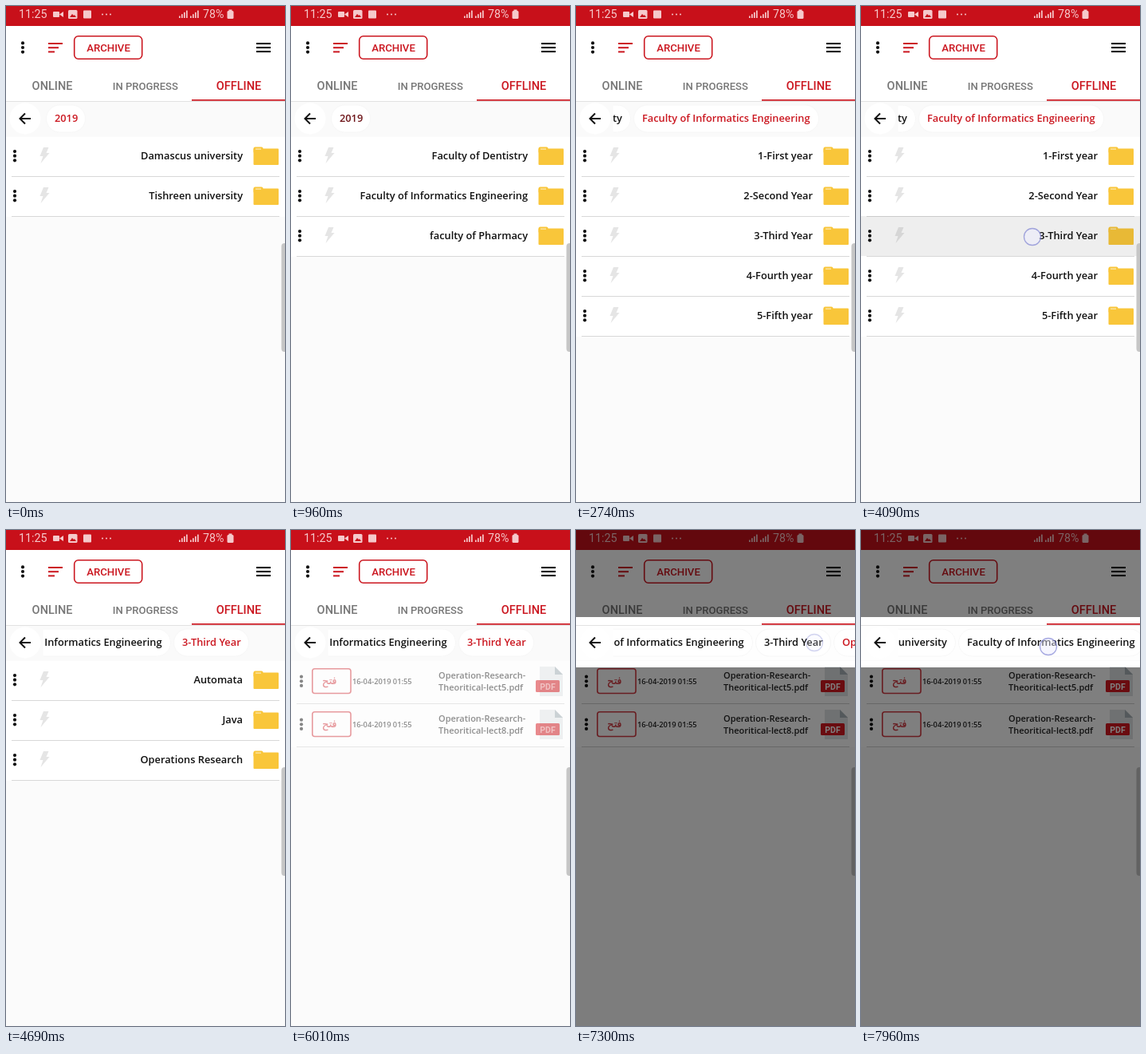
Write an HTML page with a canvas that moves like this. It is 350 px wide and 621 px high and loops after 7.99 s.

```html
<!DOCTYPE html>
<html lang="en">
<head>
<meta charset="utf-8">
<title>Archive browser</title>
<style>
  html, body { margin: 0; width: 100%; height: 100%; overflow: hidden; background: #fff; }
  canvas { display: block; }
</style>
</head>
<body>
<canvas id="stage" width="350" height="621"></canvas>
<script>
const c = document.getElementById('stage').getContext('2d');
const LOOP = 7990;
const RED = '#cb1720', BLACK = '#111';
const BODY = '"Open Sans", "Noto Sans", sans-serif';
const LABEL = `600 12.8px ${BODY}`;
const UI = 'Roboto, sans-serif';

// Lists, each with the time it appears
const lists = [
  { at: -999, items: ['Damascus university', 'Tishreen university'] },
  { at: 640, items: ['Faculty of Dentistry', 'Faculty of Informatics Engineering', 'faculty of Pharmacy'] },
  { at: 2330, items: ['1-First year', '2-Second Year', '3-Third Year', '4-Fourth year', '5-Fifth year'] },
  { at: 4280, items: ['Automata', 'Java', 'Operations Research'] },
  { at: 5960, files: ['5', '8'] }
];

// Breadcrumbs: label, left and right text edge before scrolling, time of opening
const crumbs = [
  ['2019', 61, 89, -999],
  ['Damascus university', 114, 242, 850],
  ['Faculty of Informatics Engineering', 267, 478, 2410],
  ['3-Third Year', 503, 576, 4360],
  ['Operations Research', 601, 728, 6030]
];

// Breadcrumb scrolling: start, end, distance
const scrolls = [
  [2450, 2710, 184], [4400, 4660, 98], [6090, 6350, 152],
  [6780, 7300, -167], [7440, 7960, -133]
];

// Touches: start, last move, end, x, y, horizontal travel, tapped row
const touches = [
  [90, 520, 520, 190, 190, 0, 0], [2000, 2260, 2260, 200, 239, 0, 1],
  [3950, 4210, 4210, 215, 289, 0, 2], [5610, 5880, 5880, 210, 289, 0, 2],
  [6780, 7300, 7350, 132, 141, 167], [7440, 7960, 8100, 102, 146, 133]
];

const progress = (t, a, b) => Math.min(1, Math.max(0, (t - a) / (b - a)));
const ease = p => p * p * (3 - 2 * p);

function rect(x, y, w, h, fill) {
  c.fillStyle = fill;
  c.fillRect(x, y, w, h);
}

function round(x, y, w, h, r, fill, stroke, line = 1) {
  c.beginPath();
  c.roundRect(x, y, w, h, r);
  if (fill) { c.fillStyle = fill; c.fill(); }
  if (stroke) { c.strokeStyle = stroke; c.lineWidth = line; c.stroke(); }
}

function disc(x, y, r, fill) {
  c.beginPath();
  c.arc(x, y, r, 0, 7);
  c.fillStyle = fill;
  c.fill();
}

function shape(points, fill) {
  c.beginPath();
  for (let i = 0; i < points.length; i += 2) c.lineTo(points[i], points[i + 1]);
  c.fillStyle = fill;
  c.fill();
}

function text(s, x, y, font, fill, align = 'left') {
  c.font = font;
  c.fillStyle = fill;
  c.textAlign = align;
  c.fillText(s, x, y);
}

function dots(x, y) {
  for (const dy of [-5.6, 0, 5.6]) disc(x, y + dy, 2.1, BLACK);
}

function statusBar() {
  const ink = '#f5c9cb';
  rect(0, 0, 350, 25, '#c8101a');
  text('11:25', 16, 15.3, `14.3px ${UI}`, ink);
  round(59, 7, 8, 7, 1, ink);
  shape([67, 10.5, 72, 7, 72, 14], ink);
  round(78, 5, 11.5, 11, 1.5, ink);
  shape([80, 14, 83, 10, 85, 12, 86, 11, 88, 14], '#c8101a');
  round(97, 5.5, 10, 10, 1, ink);
  for (const x of [121, 126, 131]) disc(x, 10.5, 1, ink);
  for (const x of [217, 231])
    for (let i = 0; i < 4; i++) rect(x + i * 3, 12.5 - i * 2.3, 1.7, 2.5 + i * 2.3, ink);
  text('78%', 247, 15.3, `14.2px ${UI}`, ink);
  round(277.5, 6, 8, 10, 1.5, ink);
  rect(279.5, 4.5, 4, 2, ink);
}

function header() {
  rect(0, 25, 350, 94, '#fff');
  dots(21, 52);
  [18, 13, 8].forEach((w, i) => rect(53, 46 + i * 5.2, w, 2, RED));
  round(85.7, 37.8, 85, 28.4, 5, null, RED, 1.6);
  text('ARCHIVE', 128.5, 56.5, `500 13.2px ${UI}`, RED, 'center');
  for (const y of [46, 51, 56]) rect(314, y, 18, 2.1, BLACK);
  text('ONLINE', 58, 105, `500 14.5px ${UI}`, '#777', 'center');
  text('IN PROGRESS', 174.8, 104.5, `500 13.1px ${UI}`, '#777', 'center');
  text('OFFLINE', 292, 105, `500 14.5px ${UI}`, RED, 'center');
}

function folderRow(label, y) {
  rect(0, y + 1, 350, 50, '#fff');
  rect(7, y + 50, 336, 1, '#d8d8d8');
  dots(11, y + 24.7);
  shape([47, y + 14, 53.5, y + 14, 50.5, y + 21, 54.5, y + 21, 43.5, y + 34, 46.5, y + 25, 42.5, y + 25], '#e5e5e5');
  text(label, 297, y + 29, LABEL, BLACK, 'right');
  round(310.5, y + 13.5, 12, 8, 2, '#f9c63a');
  round(310.5, y + 15.5, 31.5, 20.5, 1, '#f9c63a');
  rect(313, y + 15.5, 7, 1.2, '#fdeab8');
}

function fileRow(number, y) {
  rect(0, y + 1, 350, 54, '#fff');
  rect(7, y + 54, 336, 1, '#d0d0d0');
  dots(13, y + 26.3);
  round(26.8, y + 10.7, 48.2, 30.8, 3, null, '#d23a42', 1.6);
  text('فتح', 51, y + 30, '600 10.5px "Noto Sans Arabic", "DejaVu Sans", sans-serif', '#d23a42', 'center');
  text('16-04-2019 01:55', 77, y + 29.5, `600 9.3px ${BODY}`, '#222');
  text('Operation-Research-', 185, y + 23, `600 11px ${BODY}`, '#222');
  text(`Theoritical-lect${number}.pdf`, 185, y + 37.5, `600 11px ${BODY}`, '#222');
  shape([312, y + 8, 331, y + 8, 341, y + 18, 341, y + 45, 312, y + 45], '#e0e3e5');
  shape([331, y + 8, 341, y + 18, 331, y + 18], '#a9b3b9');
  round(307, y + 25, 30, 15, 1.5, '#d51920');
  text('PDF', 322, y + 36.5, `bold 10.5px ${UI}`, '#fff', 'center');
}

function list(t) {
  rect(0, 163, 350, 458, '#fbfbfb');
  const current = lists.findLast(l => t >= l.at);
  c.globalAlpha = progress(t, current.at - 20, current.at + 120);
  if (current.files) current.files.forEach((n, i) => fileRow(n, 163 + i * 54));
  else current.items.forEach((label, i) => folderRow(label, 163 + i * 50));
  c.globalAlpha = 1;
  for (const [start, , end, , , , row] of touches)
    if (row >= 0 && t > start && t < end)
      rect(0, 163 + row * 50, 350, 50, `rgba(0,0,0,${.07 * progress(t, start, start + 150)})`);
}

function breadcrumbs(t, dim) {
  const shade = 250 + 4 * dim;
  rect(0, 119, 350, 44, `rgb(${shade},${shade},${shade})`);
  const offset = scrolls.reduce((sum, [a, b, d]) => sum + d * ease(progress(t, a, b)), 0);
  c.save();
  c.beginPath();
  c.rect(46.5, 119, 304, 44);
  c.clip();
  crumbs.forEach(([label, left, right, at], i) => {
    // The previous crumb turns dark first, then the new one fades in
    const shown = progress(t, at + 130, at + 320);
    if (!shown) return;
    const next = crumbs[i + 1];
    const dark = next ? progress(t, next[3], next[3] + 220) : 0;
    const x = left - offset;
    c.globalAlpha = shown;
    round(x - 10.5, 124, right - left + 21, 34, 17, '#fff', '#f7f7f7');
    const mix = (a, b) => Math.round(a + (b - a) * dark);
    text(label, x, 145, LABEL, `rgb(${mix(203, 17)},${mix(23, 17)},${mix(32, 17)})`);
  });
  c.restore();
  disc(24, 141, 19.5, '#fff');
  c.beginPath();
  c.moveTo(31, 141); c.lineTo(18, 141);
  c.moveTo(24, 134.5); c.lineTo(17.5, 141); c.lineTo(24, 147.5);
  c.strokeStyle = BLACK;
  c.lineWidth = 2;
  c.stroke();
  rect(0, 119, 350, 1, '#e2e2e2');
  rect(233, 117, 117, 1.7, RED);
}

function touchMarks(t) {
  for (const [start, stop, end, x, y, travel] of touches) {
    if (t < start || t > end) continue;
    const cx = x + travel * ease(progress(t, start, stop));
    c.globalAlpha = progress(t, start, start + 60) * (1 - progress(t, end - 100, end));
    disc(cx, y, 10.5, 'rgba(235,236,255,.45)');
    c.strokeStyle = 'rgba(110,115,205,.6)';
    c.lineWidth = 1.3;
    c.stroke();
    c.globalAlpha = 1;
  }
}

function draw(t) {
  const dim = progress(t, 6400, 7000);
  statusBar();
  header();
  list(t);
  breadcrumbs(t, dim);
  round(345.5, 297, 10, 136, 4, '#c6c6c6');
  // Everything but the breadcrumb band darkens
  if (dim) {
    const veil = `rgba(0,0,0,${dim / 2})`;
    rect(0, 0, 350, 109, veil);
    rect(0, 172, 350, 449, veil);
  }
  touchMarks(t);
}

const begin = performance.now();
function tick() {
  draw((performance.now() - begin) % LOOP);
  requestAnimationFrame(tick);
}
tick();
</script>
</body>
</html>
```
